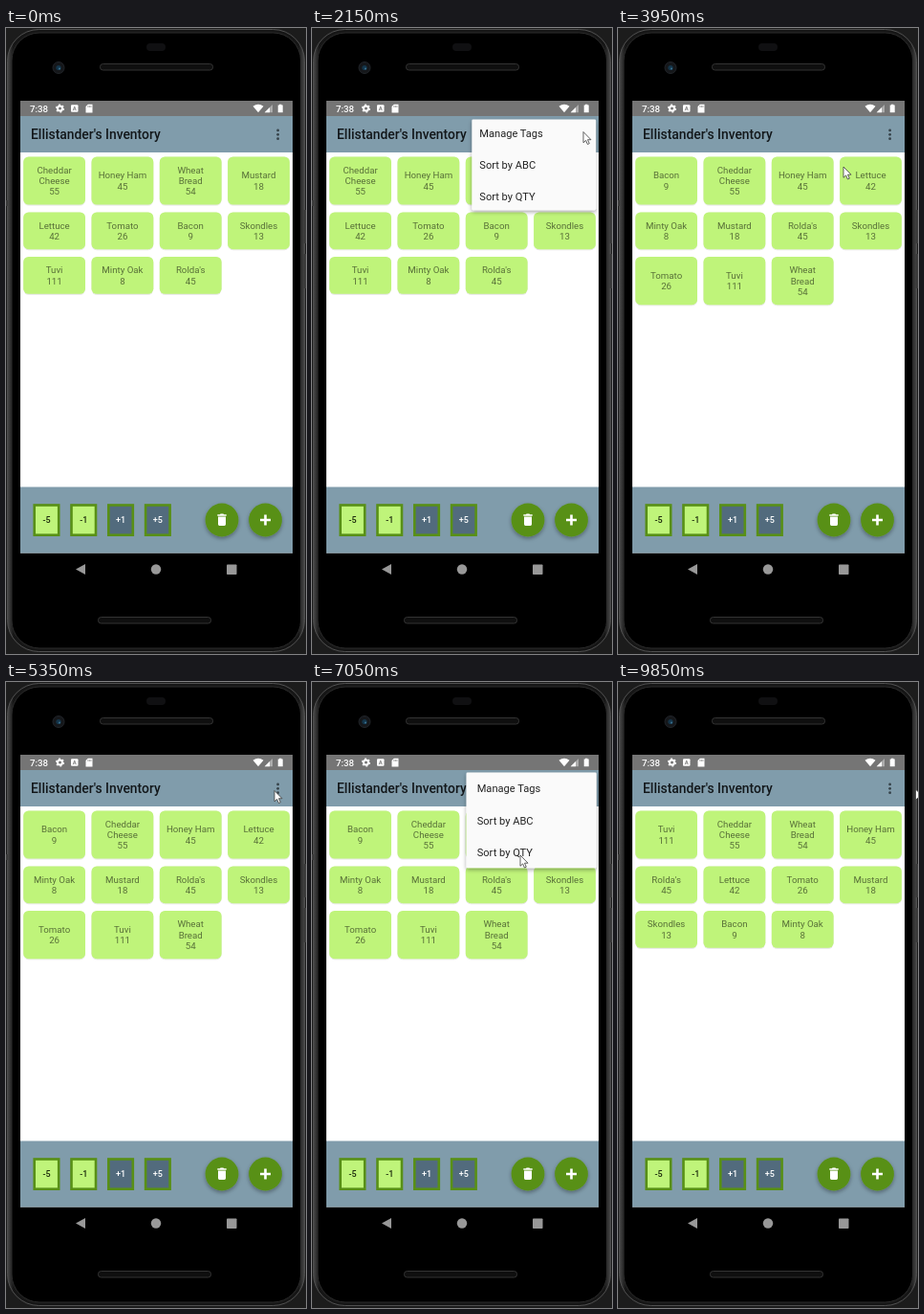
Animation, 314 px wide and 654 px high, one loop 9900 ms. Source, as an HTML page:

```html
<!DOCTYPE html>
<html lang="en">
<head>
<meta charset="utf-8">
<title>Inventory app</title>
<style>
html, body { margin: 0; width: 100%; height: 100%; overflow: hidden; background: #1c1c1c; }
svg { display: block; width: 100vw; height: 100vh; font-family: Roboto, sans-serif; }
.mid { text-anchor: middle; }
.card text { font-size: 9.7px; fill: #000; fill-opacity: .54; }
.btn { font-size: 9px; font-weight: 500; }
#labels { font-size: 11.1px; fill: #222; }
</style>
</head>
<body>
<svg viewBox="0 0 314 654" xmlns="http://www.w3.org/2000/svg">
  <defs>
    <linearGradient id="rim" x1="0" x2="1" y1="0" y2="0">
      <stop offset="0" stop-color="#4a4a4a"/><stop offset=".02" stop-color="#161616"/>
      <stop offset=".98" stop-color="#161616"/><stop offset="1" stop-color="#4a4a4a"/>
    </linearGradient>
    <filter id="soft" x="-30%" y="-30%" width="160%" height="170%">
      <feDropShadow dx="0" dy="2" stdDeviation="2" flood-color="#000" flood-opacity=".35"/>
    </filter>
    <filter id="faint" x="-10%" y="-10%" width="120%" height="130%">
      <feDropShadow dx="0" dy=".5" stdDeviation=".6" flood-color="#000" flood-opacity=".22"/>
    </filter>
    <clipPath id="reveal"><rect class="pane"/></clipPath>
  </defs>

  <!-- phone body -->
  <rect width="314" height="654" fill="#1c1c1c"/>
  <rect x="1.5" y="1.5" width="311" height="650" rx="33" fill="url(#rim)" stroke="#505050"/>
  <rect x="6" y="5" width="302.5" height="643" rx="29" fill="#000" stroke="#2c2c2c"/>
  <path d="M0 180h2v6h-2zM311.500 190h2.500v35h-2.500zM311.500 236h2.500v36h-2.500z" fill="#3a3a3a"/>
  <rect x="147" y="16" width="20" height="8" rx="4" fill="#101012"/>
  <rect x="98.500" y="37.500" width="118" height="6.500" rx="3" fill="#0f0f0f" stroke="#333"/>
  <rect x="96.500" y="615.500" width="118" height="6.500" rx="3" fill="#0f0f0f" stroke="#333"/>
  <circle cx="55" cy="41.500" r="6" fill="#15171a" stroke="#22252a"/>
  <circle cx="55" cy="41.500" r="2.600" fill="#14354a"/>
  <circle cx="56" cy="42.500" r="1" fill="#3d7593"/>

  <!-- screen -->
  <rect x="15" y="76" width="285" height="472.500" fill="#fff"/>
  <rect x="15" y="76" width="285" height="16.200" fill="#757575"/>
  <rect x="15" y="92" width="285" height="38" fill="#809cab"/>
  <rect x="15" y="479.500" width="285" height="69" fill="#809cab"/>
  <text x="25" y="87.600" font-size="9.700" font-weight="500" fill="#fff">7:38</text>
  <g fill="#fff">
    <circle cx="56.500" cy="84" r="2.500" fill="none" stroke="#fff" stroke-width="2"/>
    <circle cx="56.500" cy="84" r="3.900" fill="none" stroke="#fff" stroke-width="1.300" stroke-dasharray="2 2.084"/>
    <rect x="68" y="80.300" width="7.500" height="7.500" rx="1"/>
    <path d="M70.200 86.200L71.750 82L73.300 86.200M70.800 84.900h1.900" fill="none" stroke="#757575" stroke-width=".8"/>
    <path d="M85.800 79.800h4.700v8.600h-7v-6.300z"/>
    <path d="M85.900 81.200v1.700M87.400 81.200v1.700M88.900 81.200v1.700" stroke="#757575" stroke-width=".7"/>
    <path d="M258.500 81.700Q264 77.700 269.500 81.700L264 88.300z"/>
    <path d="M279 80v8.300h-8.300z" fill-opacity=".4"/>
    <path d="M276 83v5.300h-5.300z"/>
    <path d="M286 79.700h2.400v.9h1.300v7.700h-5v-7.700h1.300z"/>
  </g>
  <text x="26" y="116.300" font-size="13.870" font-weight="500" fill="#12171a">Ellistander's Inventory</text>
  <g fill="#36434a">
    <circle cx="284.600" cy="106.900" r="1.400"/><circle cx="284.600" cy="111.300" r="1.400"/><circle cx="284.600" cy="115.700" r="1.400"/>
  </g>
  <g id="grid"></g>
  <g id="buttons"></g>
  <g fill="#589016" filter="url(#soft)">
    <circle cx="226" cy="514" r="17.400"/><circle cx="271.500" cy="514" r="17.400"/>
  </g>
  <path d="M221.300 508.300h2.500l.8-.9h2.800l.8 .9h2.500v1.400h-9.400zM222 510.500h8v8q0 1.400-1.400 1.400h-5.200q-1.400 0-1.400-1.400z" fill="#fff"/>
  <path d="M271.500 508.500v11M266 514h11" stroke="#fff" stroke-width="2.600"/>
  <g fill="#989898">
    <path d="M83 560v11l-10-5.500z"/><circle cx="157" cy="565.500" r="5.200"/><rect x="231" y="560.500" width="10.500" height="10.500" rx=".8"/>
  </g>

  <g id="menu">
    <rect class="pane" rx="1.400" fill="#fafafa" filter="url(#soft)"/>
    <g clip-path="url(#reveal)"><g id="labels">
      <text x="172.700" y="115.300">Manage Tags</text>
      <text x="172.700" y="148.500">Sort by ABC</text>
      <text x="172.700" y="181.700">Sort by QTY</text>
    </g></g>
  </g>
  <path id="cursor" d="M0 0V11.300L2.600 8.900L4.400 13L6.300 12.200L4.500 8.200H8z" fill="#fff" stroke="#3c3c3c" stroke-width=".8"/>
</svg>
<script>
const LOOP = 9900, STEP = 50;
const LINE = 11.4, LIME = '#bff47a';
const $ = id => document.getElementById(id);
const mix = (a, b, p) => a + (b - a) * p;
const clamp = v => Math.max(0, Math.min(1, v));

// A slash breaks the name over two lines.
const items = [
  ['Cheddar/Cheese', 55], ['Honey Ham', 45], ['Wheat/Bread', 54], ['Mustard', 18],
  ['Lettuce', 42], ['Tomato', 26], ['Bacon', 9], ['Skondles', 13],
  ['Tuvi', 111], ['Minty Oak', 8], ["Rolda's", 45]
];
const byName = [...items].sort((a, b) => a[0] < b[0] ? -1 : 1);
const byQty = [...byName].sort((a, b) => b[1] - a[1]);

function cardRows(list) {
  let y = 134.4, out = '';
  for (let i = 0; i < list.length; i += 4) {
    const row = list.slice(i, i + 4).map(([name, qty]) => [...name.split('/'), qty]);
    const h = Math.max(...row.map(r => r.length)) * LINE + 16;
    row.forEach((lines, col) => {
      const x = 18.2 + col * 71.3;
      out += `<rect x="${x}" y="${y}" width="64.800" height="${h}" rx="5.500" fill="${LIME}" filter="url(#faint)"/>`;
      lines.forEach((s, k) => {
        const base = y + h / 2 + (k - (lines.length - 1) / 2) * LINE + 3.4;
        out += `<text class="mid" x="${x + 32.4}" y="${base}">${s}</text>`;
      });
    });
    y += h + 7.8;
  }
  return out;
}

const layouts = [items, byName, byQty].map(list => {
  const g = document.createElementNS('http://www.w3.org/2000/svg', 'g');
  g.setAttribute('class', 'card');
  g.innerHTML = cardRows(list);
  $('grid').append(g);
  return g;
});

$('buttons').innerHTML = ['-5', '-1', '+1', '+5'].map((s, i) => {
  const x = 29.7 + i * 38.8, on = i < 2;
  return `<rect x="${x}" y="498.500" width="25.500" height="31.200" fill="${on ? LIME : '#526b7d'}" stroke="#589016" stroke-width="2.600"/>
    <text class="btn mid" x="${x + 12.8}" y="517.300" fill="${on ? '#1c2a0c' : '#fff'}">${s}</text>`;
}).join('');

// Pointer stops: time, x, y
const path = [
  [550, 312, 118], [850, 296, 116], [1200, 279, 107], [1350, 279, 107], [1550, 284, 108.5],
  [2500, 284, 108.5], [2950, 236, 145], [3950, 236, 145], [4900, 229, 131], [5000, 229, 131],
  [5350, 281, 113.5], [5600, 290.5, 108], [6250, 290.5, 108], [6700, 218, 181],
  [7900, 218, 181], [8450, 316, 140]
];

function pointer(t) {
  if (t >= 9850) return [311.5, 112];
  if (t < path[0][0]) return [330, 112];
  const i = path.findIndex(p => p[0] > t);
  if (i < 0) return [330, 112];
  const [a, b] = [path[i - 1], path[i]];
  const p = (t - a[0]) / (b[0] - a[0]), e = p * p * (3 - 2 * p);
  return [mix(a[1], b[1], e), mix(a[2], b[2], e)];
}

const panes = document.querySelectorAll('.pane');
const menus = [[2000, 3200], [5750, 7050]];

// The panel unfolds from the overflow button and later fades out.
function drawMenu(t) {
  const span = menus.find(([open, close]) => t >= open && t < close + 280);
  $('menu').style.display = span ? '' : 'none';
  if (!span) return;
  const rest = (1 - clamp((t - span[0]) / 235)) ** 3, p = 1 - rest;
  const left = mix(285, 161.5, p), right = mix(285, 297.8, p);
  const top = mix(111, 94.6, p), bottom = mix(111, 194.2, p);
  for (const r of panes) {
    r.setAttribute('x', left);
    r.setAttribute('y', top);
    r.setAttribute('width', right - left);
    r.setAttribute('height', bottom - top);
  }
  $('labels').setAttribute('transform', `translate(${55 * rest} ${-33 * rest})`);
  $('menu').setAttribute('opacity', clamp((t - span[0] + 50) / 100) * (1 - clamp((t - span[1]) / 275)));
}

function draw(t) {
  const shown = t < 3250 ? 0 : t < 7100 ? 1 : 2;
  layouts.forEach((g, i) => g.style.display = i === shown ? '' : 'none');
  drawMenu(t);
  $('cursor').setAttribute('transform', `translate(${pointer(t)})`);
}

const start = performance.now();
function tick() {
  const t = (performance.now() - start) % LOOP;
  draw(Math.floor(t / STEP) * STEP);
  requestAnimationFrame(tick);
}
tick();
</script>
</body>
</html>
```
